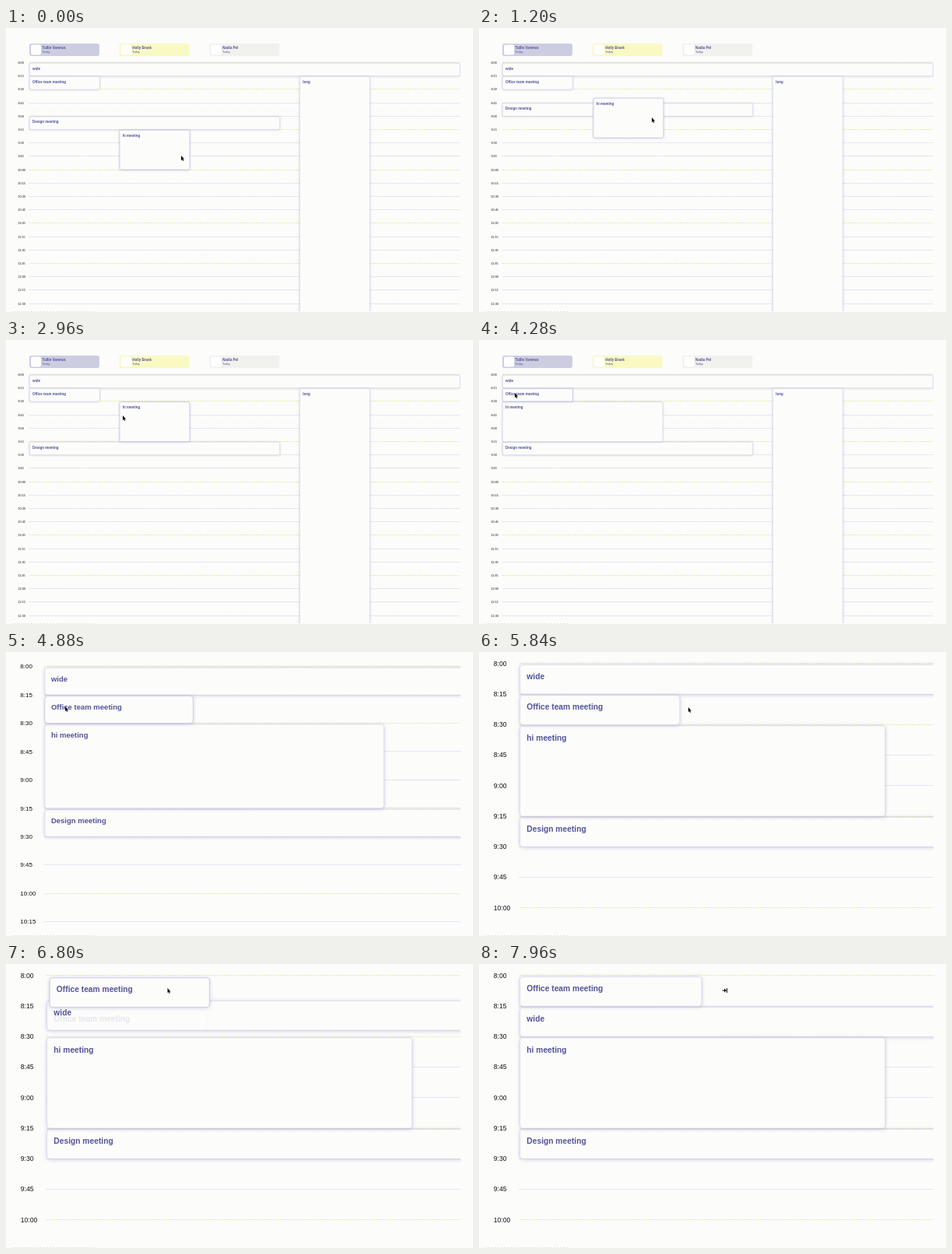
An HTML page with a canvas that plays this animation: 600 px wide and 365 px high, repeating every 8 s.

```html
<!DOCTYPE html>
<html lang="en">
<head>
<meta charset="utf-8">
<title>Day planner</title>
<style>
  html, body { margin: 0; width: 100%; height: 100%; overflow: hidden; background: #fcfcfb; }
  canvas { display: block; }
</style>
</head>
<body>
<canvas id="stage" width="600" height="365"></canvas>
<script>
const ctx = document.getElementById('stage').getContext('2d');
const LOOP = 8000, ZOOM = 2.28;
const LEFT = 30, TOP = 44.5, ROW = 17.2, COLUMN = 115.7, CARD = 90;
const FONT = '"Liberation Sans", Arial, sans-serif';
const PAPER = '#fcfcfb', INK = '#53539a';

const people = [
  ['Tullio Varenza', '#cdcde2'],
  ['Holly Brask', '#f9f9c4'],
  ['Nadia Pel', '#f1f1ee']
];

// time, x, y
const cursorPath = [
  [0, 225, 167], [400, 221, 159], [1200, 222, 118], [1700, 222, 107], [1950, 222, 107],
  [2600, 152, 100], [2960, 150, 100], [3080, 147, 101], [3500, 62, 101], [3700, 60, 101],
  [4200, 46, 71], [4300, 46, 71], [5150, 90, 74], [5600, 262, 73], [5840, 269, 74],
  [6200, 206, 72], [6400, 204, 72], [6800, 207.5, 34], [7050, 207, 34], [7450, 258, 34],
  [7600, 259, 34], [7960, 316, 34], [8000, 320, 34]
];

const clamp = p => Math.max(0, Math.min(1, p));
const mix = (a, b, p) => a + (b - a) * p;
const easeOut = p => 1 - (1 - p) ** 3;
const easeInOut = p => p < 0.5 ? 4 * p ** 3 : 1 - 4 * (1 - p) ** 3;

// Each step is [start, value]; the value glides there in 300 ms.
const glide = (t, value, ...steps) =>
  steps.reduce((v, [start, next]) => mix(v, next, easeOut(clamp((t - start) / 300))), value);

function cursorAt(t) {
  const i = cursorPath.findIndex(point => point[0] > t);
  const [t0, x0, y0] = cursorPath[i - 1], [t1, x1, y1] = cursorPath[i];
  const p = (t - t0) / (t1 - t0);
  return { x: mix(x0, x1, p), y: mix(y0, y1, p) };
}

function cameraAt(t) {
  const p = easeInOut(clamp((t - 4300) / 850));
  const s = mix(1, ZOOM, p);
  return { s, x: x => s * x - 16.4 * p, y: y => s * y - 86.5 * p };
}

function text(cam, str, x, y, size, color, weight = 'normal') {
  ctx.font = `${weight} ${size * cam.s}px ${FONT}`;
  ctx.fillStyle = color;
  ctx.textBaseline = 'middle';
  ctx.fillText(str, cam.x(x), cam.y(y) + 0.5);
}

function roundBox(x, y, w, h, r) {
  ctx.beginPath();
  ctx.roundRect(x, y, w, h, r);
}

function drawPeople(cam) {
  people.forEach(([name, color], i) => {
    const x = LEFT + i * COLUMN;
    roundBox(cam.x(x), cam.y(20), CARD * cam.s, 16 * cam.s, 3 * cam.s);
    ctx.fillStyle = color;
    ctx.fill();
    roundBox(cam.x(x + 2), cam.y(21.5), 13 * cam.s, 13 * cam.s, 2 * cam.s);
    ctx.fillStyle = '#fefefe';
    ctx.fill();
    text(cam, name, x + 16.5, 25.3, 4.5, INK, 'bold');
    text(cam, 'Today', x + 16.5, 30, 3.7, INK);
  });
}

function drawGrid(cam) {
  ctx.lineWidth = 1;
  for (let i = 0; i <= 18; i++) {
    const y = TOP + i * ROW;
    const label = `${8 + Math.floor(i / 4)}:${String(i % 4 * 15).padStart(2, '0')}`;
    text(cam, label, 15.4, y, 3.8, '#111');
    const warm = [0, 2, 5, 8, 12, 15].includes(i);
    ctx.strokeStyle = warm ? '#e8e8b4' : '#cfcfe2';
    ctx.setLineDash(warm ? [2, 1] : [1, 1]);
    ctx.beginPath();
    ctx.moveTo(cam.x(LEFT), Math.floor(cam.y(y)) + 0.5);
    ctx.lineTo(cam.x(583), Math.floor(cam.y(y)) + 0.5);
    ctx.stroke();
  }
  ctx.setLineDash([]);
}

function drawEvent(cam, cursor, { title, col = 0, cols, row, rows = 1, dx = 0, dy = 0, alpha = 1 }) {
  const left = LEFT + col * COLUMN + dx, top = TOP + row * ROW + dy;
  const x = cam.x(left + 0.3), y = cam.y(top + 0.7);
  const w = ((cols - 1) * COLUMN + CARD) * cam.s, h = (rows * ROW - 0.7) * cam.s;
  const hover = cursor.x > x && cursor.x < x + w && cursor.y > y && cursor.y < y + h;
  ctx.save();
  ctx.globalAlpha = alpha;
  roundBox(x, y, w, h, 1.8 * cam.s);
  if (alpha === 1) {
    ctx.shadowColor = 'rgba(115, 115, 175, 0.42)';
    ctx.shadowBlur = 1.5 + 1.5 * cam.s;
    ctx.shadowOffsetY = 0.3 * cam.s;
    ctx.fillStyle = PAPER;
    ctx.fill();
    ctx.shadowColor = 'transparent';
  }
  ctx.lineWidth = 0.7;
  ctx.strokeStyle = hover ? '#c4c4dc' : '#dadaea';
  ctx.stroke();
  text(cam, title, left + 4.1, top + 7.4, 4.5, INK, 'bold');
  ctx.restore();
}

function eventsAt(t, cursor) {
  const movingHi = t >= 400 && t < 1900;
  const movingOffice = t >= 6400 && t < 7000;
  const left = glide(t, 1, [3300, 0]);
  const hi = { title: 'hi meeting', col: left, cols: 2 - left, row: t < 1900 ? 5 : 2, rows: 3 };
  const office = {
    title: 'Office team meeting',
    cols: glide(t, 1, [7950, 2]),
    row: t < 7000 ? 1 : 0
  };
  const list = [
    { title: 'wide', cols: 5, row: glide(t, 0, [6680, 1]) },
    { title: 'long', col: 3, cols: 1, row: 1, rows: 30 },
    { title: 'Design meeting', cols: 3, row: glide(t, 4, [750, 3], [1450, 5]) }
  ];
  const drag = (item, dx, dy) => [{ ...item, alpha: 0.13 }, { ...item, dx, dy }];
  if (movingHi) list.push(office, ...drag(hi, cursor.x - 221, cursor.y - 159));
  else if (movingOffice) list.push(hi, ...drag(office, (cursor.x - 204) / ZOOM, (cursor.y - 72) / ZOOM));
  else list.push(hi, office);
  return list;
}

function drawCursor({ x, y }, resizing, direction) {
  ctx.save();
  ctx.translate(x, y);
  ctx.fillStyle = '#111';
  ctx.beginPath();
  if (resizing) {
    ctx.scale(direction, 1);
    ctx.rect(-3.5, -0.6, 4, 1.2);
    ctx.rect(2, -3, 1, 6);
    ctx.moveTo(-1, -2.5);
    ctx.lineTo(2, 0);
    ctx.lineTo(-1, 2.5);
  } else {
    [[0, -3], [0, 3.2], [1.3, 2], [2.3, 4], [3.3, 3.5], [2.4, 1.6], [4.2, 1.4]]
      .forEach(([px, py]) => ctx.lineTo(px, py));
  }
  ctx.fill();
  ctx.restore();
}

function draw(t) {
  const cam = cameraAt(t), cursor = cursorAt(t);
  ctx.fillStyle = PAPER;
  ctx.fillRect(0, 0, 600, 365);
  ctx.save();
  ctx.beginPath();
  ctx.rect(0, 10, 584, 354);
  ctx.clip();
  drawPeople(cam);
  drawGrid(cam);
  eventsAt(t, cursor).forEach(item => drawEvent(cam, cursor, item));
  ctx.restore();

  ctx.fillStyle = '#e6e6e8';
  for (let x = 8; x < 116; x += 4) ctx.fillRect(x, 364, 2, 1);

  const pullLeft = t >= 3050 && t < 3650;
  drawCursor(cursor, pullLeft || t >= 7450, pullLeft ? -1 : 1);
}

function tick() {
  draw(performance.now() % LOOP);
  requestAnimationFrame(tick);
}
tick();
</script>
</body>
</html>
```
